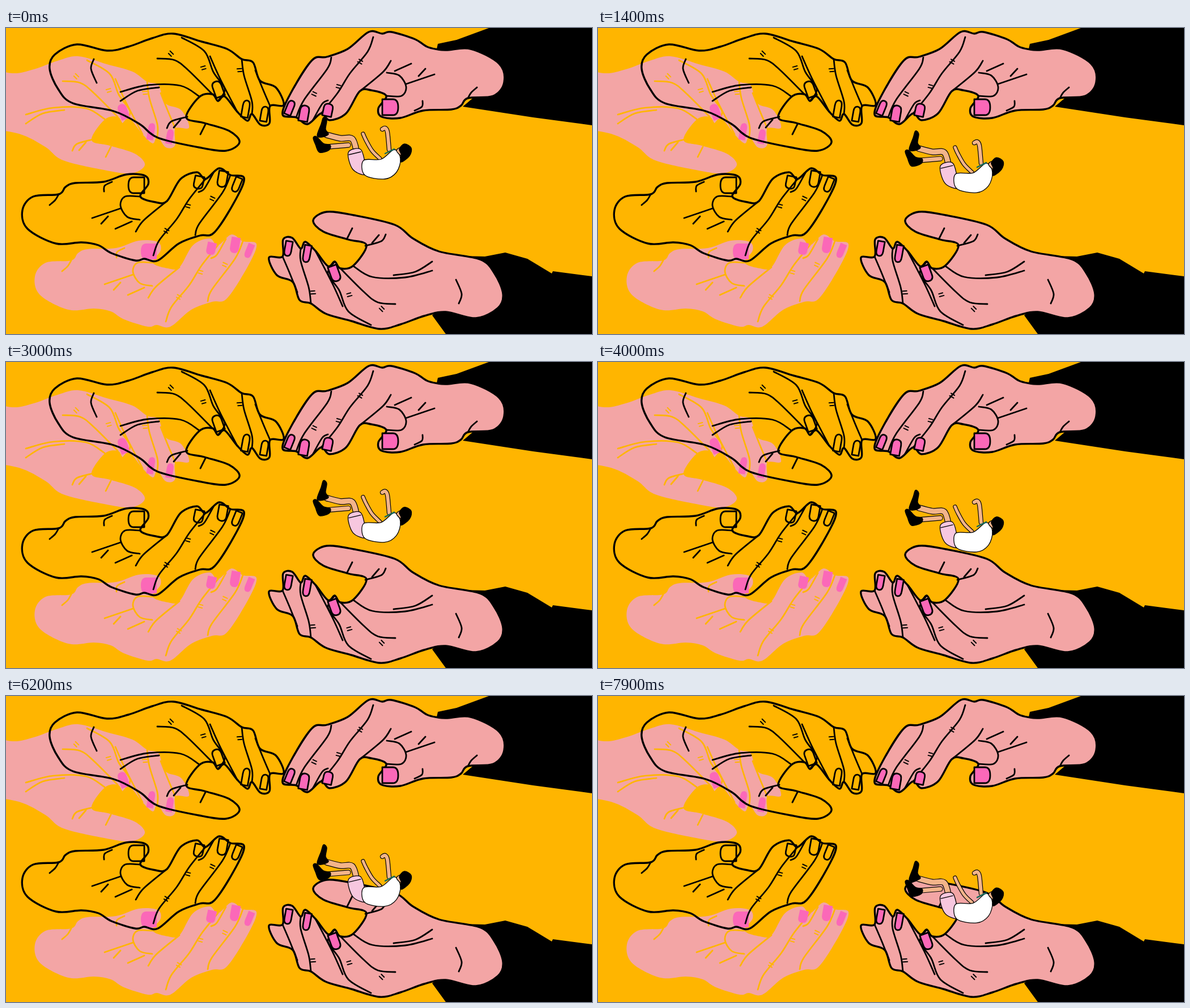
Recreate the animation shown at these times as an HTML page. Size 1034x541 px, loop 8 s.

```html
<!DOCTYPE html>
<html lang="en">
<head>
<meta charset="utf-8">
<title>Falling between hands</title>
<style>
html, body { margin: 0; width: 100%; height: 100%; overflow: hidden; background: #ffb500; }
svg { display: block; width: 100%; height: 100%; }
path { stroke-linecap: round; stroke-linejoin: round; }
</style>
</head>
<body>
<svg viewBox="0 0 1034 541" xmlns="http://www.w3.org/2000/svg">
  <path d="M852 0L795 21 762 28 760 37 800 60 840 110 806 139 930 158 1034 172V0Z"/>
  <path d="M804 403L845 404 881 397 920 408 963 434 965 430 1034 439V541H776L752 508 800 460Z"/>
  <g id="hands" fill="none"></g>
  <g id="faller" fill="none" stroke="#000" stroke-width="1.3"></g>
</svg>
<script>
const YELLOW = '#ffb500', SKIN = '#f3a5a5', NAIL = '#fb68b8', INK = '#000', TAN = '#f3b48a';
const hands = document.getElementById('hands');
const faller = document.getElementById('faller');

function add(parent, tag, attrs) {
  const node = document.createElementNS('http://www.w3.org/2000/svg', tag);
  for (const key in attrs) node.setAttribute(key, attrs[key]);
  return parent.appendChild(node);
}

// Smooth curve through key points "x,y x,y ..."; "/" separates strokes.
function curve(text, closed = false) {
  return text.split('/').map(stroke => {
    const p = stroke.trim().split(/\s+/).map(s => s.split(',').map(Number));
    const n = p.length;
    const at = i => closed ? p[(i + n) % n] : p[Math.max(0, Math.min(n - 1, i))];
    let d = 'M' + p[0];
    for (let i = 0; i < (closed ? n : n - 1); i++) {
      const [a, b, c, e] = [at(i - 1), at(i), at(i + 1), at(i + 2)];
      const out = b.map((v, k) => v + (c[k] - a[k]) / 6);
      const into = c.map((v, k) => v - (e[k] - b[k]) / 6);
      d += `C${out} ${into} ${c}`;
    }
    return d + (closed ? 'Z' : '');
  }).join('');
}

// Nails: x, y, angle, half width, half height. Knuckles: x, y, angle.
const thumbUp = {
  outline: `93,294 105,281 122,274 172,272 212,259 245,261 251,276 237,298 264,308 284,306
    308,267 337,255 352,267 376,248 396,260 420,265 406,302 368,361 342,367 305,381
    268,411 244,408 228,411 186,398 163,384 133,379 88,381 38,355 29,322 48,298`,
  folds: `77,313 87,304 93,294 / 173,289 174,279 187,272 / 237,298 210,298 202,314 214,334 236,339
    / 152,336 202,319 / 168,346 180,333 / 193,355 222,342 / 284,306 243,340 229,360
    / 352,267 323,303 301,338 270,376 260,402 / 366,256 350,284 340,290
    / 396,260 382,291 341,346 334,366`,
  nails: [[230, 278, 90, 14, 14], [340, 273, 12, 8, 11], [382, 267, 10, 8, 14], [407, 277, 22, 6, 13]],
  knuckles: [[283, 358, 30], [321, 314, 15], [364, 301, 25]]
};

const thumbDown = {
  outline: `77,72 86,47 125,29 178,40 216,33 258,18 295,10 345,24 390,37 416,55 436,61 448,93
    476,105 490,136 466,138 465,168 449,171 434,152 426,164 408,148 386,121 374,129 364,117
    341,122 318,158 350,168 394,182 412,202 388,217 340,211 268,194 236,170 190,147 118,133 92,108`,
  folds: `310,17 350,41 366,78 386,108 374,129 / 364,117 322,75 298,57 267,54 / 360,50 378,90 408,148
    / 416,55 420,84 434,130 434,152 / 440,75 454,110 466,138 / 202,129 232,111 270,105
    / 202,113 250,101 308,102 341,121 / 284,177 292,165 320,157 / 296,176 308,162
    / 343,188 352,170 / 155,55 150,72 160,97`,
  nails: [[374, 108, 160, 8, 14], [423, 143, 190, 6, 15], [456, 152, 190, 6, 13]],
  knuckles: [[291, 45, 45], [348, 70, -15], [412, 74, -5]]
};

function hand(shape, transform, { fill = 'none', line, nail = 'none', border = 'none', weight }) {
  const g = add(hands, 'g', { transform, stroke: line, 'stroke-width': weight });
  add(g, 'path', { d: curve(shape.outline, true), fill, stroke: border, 'stroke-width': 3.4 });
  add(g, 'path', { d: curve(shape.folds) });
  for (const [x, y, angle, w, h] of shape.nails)
    add(g, 'path', {
      d: `M${-w} ${-h}H${w}V${h / 3}Q${w} ${h} 0 ${h}T${-w} ${h / 3}Z`.replace('T', `Q${-w} ${h} `),
      transform: `translate(${x} ${y}) rotate(${angle})`, fill: nail, stroke: border
    });
  for (const [x, y, angle] of shape.knuckles)
    add(g, 'path', {
      d: 'M-4 -2H4M-3 3H4', 'stroke-width': 2,
      transform: `translate(${x} ${y}) rotate(${angle})`
    });
}

const shadow = { fill: SKIN, line: YELLOW, nail: NAIL, weight: 2.7 };
const sketch = { line: INK, border: INK, weight: 2.8 };
const solid = { ...sketch, fill: SKIN, nail: NAIL };
hand(thumbDown, 'translate(-167 40)', shadow);
hand(thumbUp, 'translate(22 117)', shadow);
hand(thumbDown, '', sketch);
hand(thumbUp, '', sketch);
hand(thumbUp, 'translate(908 418) rotate(180)', solid);
hand(thumbDown, 'translate(954 542) rotate(180)', solid);

const part = (points, fill) => add(faller, 'path', { d: curve(points, true), fill });
const stroke = (points, color, width) =>
  add(faller, 'path', { d: curve(points), stroke: color, 'stroke-width': width });
function limb(points, width) {
  stroke(points, INK, width + 2.4);
  stroke(points, TAN, width);
}

limb('568,210 604,207', 7);
limb('566,189 590,195 611,196 619,220', 9);
part('560,158 566,163 564,179 569,188 557,193 549,190 556,170', INK);
part('542,194 548,192 560,204 572,207 570,216 553,220 546,206', INK);
part('604,220 625,214 633,236 635,259 612,250', '#f7c7df');
stroke('605,224 626,219', INK, 1.3);
limb('630,187 635,198 646,217 660,231', 5);
limb('664,179 669,177 673,184 676,215', 6);
part('631,234 662,232 685,215 696,231 689,255 668,267 633,260', '#fff');
stroke('669,222 685,214', '#136b5c', 2.5);
part('689,217 696,212 698,226', TAN);
part('694,214 703,205 715,212 712,226 697,237 697,223', INK);

// The fall advances in even steps and rests for one of them.
const STEP = 100, LOOP = 8000, REST = 53, DROP = 1.72;
function frame() {
  const tick = Math.floor(performance.now() % LOOP / STEP);
  const steps = tick >= REST ? tick - 1 : tick;
  faller.setAttribute('transform', `translate(0 ${(steps * DROP).toFixed(2)})`);
  requestAnimationFrame(frame);
}
frame();
</script>
</body>
</html>
```
